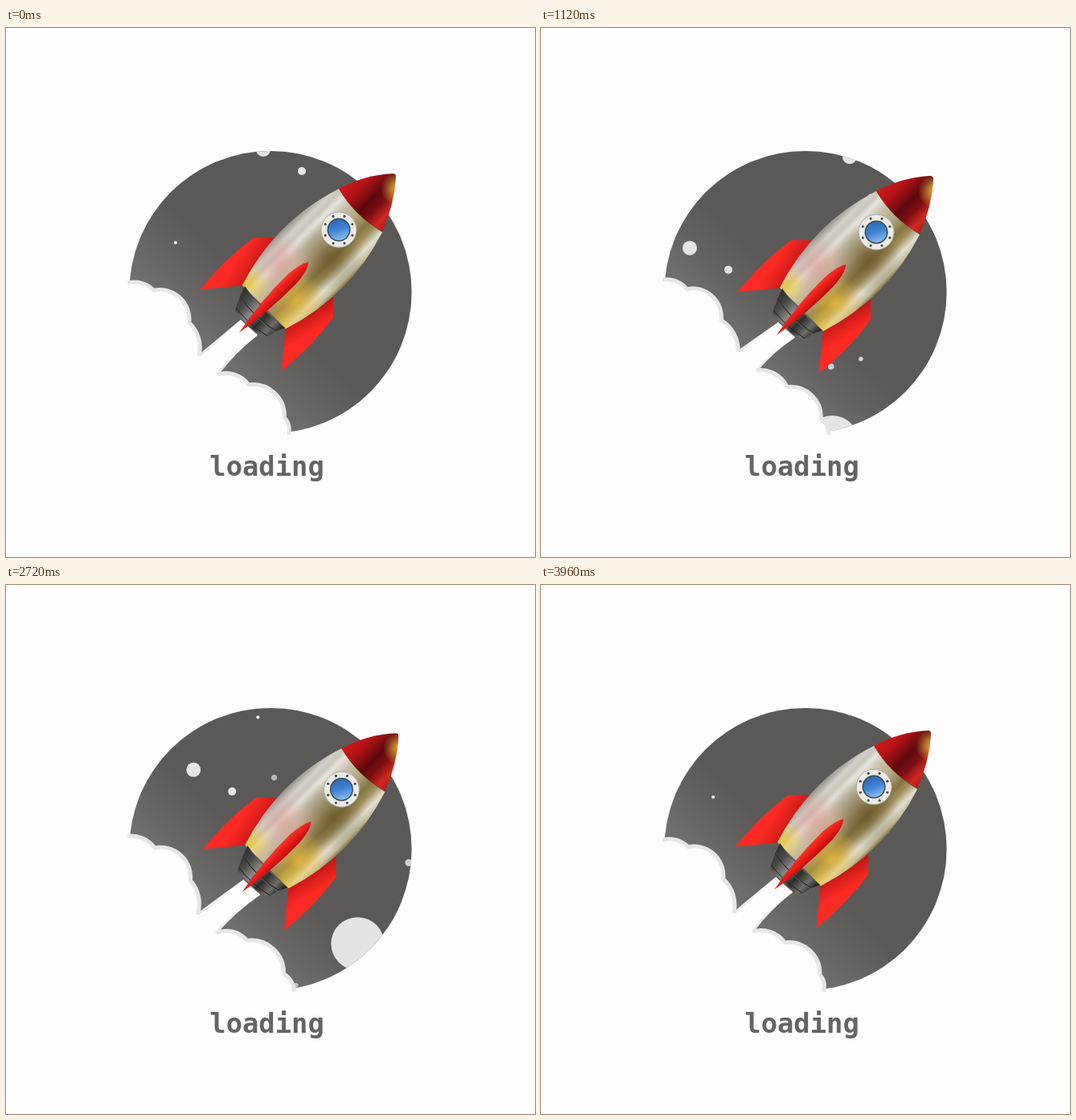
Animation, 658 px wide and 658 px high, one loop 4000 ms. Source, as an HTML page:

```html
<!DOCTYPE html>
<html lang="en">
<head>
<meta charset="utf-8">
<title>Loading</title>
<style>
  html, body { margin: 0; width: 100%; height: 100%; overflow: hidden; background: #fdfdfd; }
  svg { display: block; width: 100vw; height: 100vh; }
  text { font: bold 33.8px "DejaVu Sans Mono", monospace; fill: #656463; }
</style>
</head>
<body>
<svg viewBox="0 0 658 658">
  <defs>
    <clipPath id="disc"><circle cx="329" cy="328.5" r="175.6"/></clipPath>
    <clipPath id="hull"><path d="M414 200Q335 240 294 320L348 374Q428 333 468 254Q434 234 414 200Z"/></clipPath>
    <clipPath id="cone"><path d="M414 200Q445 183 481 181Q485 181 485 185Q483 220 468 253Q434 234 414 200Z"/></clipPath>
    <g id="grads"></g>
  </defs>

  <rect width="658" height="658" fill="#fdfdfd"/>
  <circle cx="329" cy="328.5" r="175.6" fill="url(#sky)"/>
  <g id="stars" clip-path="url(#disc)"></g>

  <path id="smoke" fill="#fdfdfd"/>
  <path id="jet" fill="none" stroke="url(#fade)" stroke-width="3"/>
  <path id="rim" fill="none" stroke="#e6e6e6" stroke-width="5" stroke-linejoin="round"/>

  <g id="rocket">
    <path fill="url(#finL)" d="M241.5 325.5Q271 288 308 261L334 261Q312 287 297 320Z"/>
    <path fill="url(#finR)" d="M342.5 426.5L348 371Q381 356 407 334L407 360Q380 397 342.5 426.5Z"/>
    <g clip-path="url(#hull)" id="skin"><rect x="280" y="190" width="200" height="200" fill="url(#metal)"/></g>
    <g clip-path="url(#cone)" id="tip"><rect x="400" y="170" width="100" height="100" fill="url(#nose)"/></g>
    <g fill="url(#steel)">
      <path d="M297 321Q318 352 347 373L336 377Q309 360 291 334Z"/>
      <path d="M291 335Q309 361 334 378L326 383Q300 368 286 347Z"/>
      <path d="M286 348Q302 369 325 383L319 384Q300 371 285 352Z"/>
    </g>
    <path fill="none" stroke="#1e1e1e" d="M291 334Q309 360 336 377M286 348Q301 368 325 383"/>
    <path fill="url(#blade)" d="M290 379Q317 339 350 307Q366 293 376 291Q376 301 361 318Q329 351 290 379Z"/>
    <g transform="translate(414 251)">
      <circle r="22" fill="#ecebe8" stroke="#a9a79f"/>
      <g id="bolts" fill="#4a4a4c"></g>
      <circle r="14.5" fill="#3a4658"/>
      <circle r="13" fill="url(#glass)"/>
    </g>
  </g>
  <text x="253.3" y="556.5">loading</text>
</svg>

<script>
const LOOP = 4000, STEP = 40, TURN = 2 * Math.PI;
const $ = id => document.getElementById(id);
const add = (parent, tag, attrs) => {
  const el = document.createElementNS("http://www.w3.org/2000/svg", tag);
  for (const k in attrs) el.setAttribute(k, attrs[k]);
  parent.appendChild(el);
  return el;
};

// stops are written as "colour position%" pairs
function gradient(id, x1, y1, x2, y2, stops) {
  const grad = add($("grads"), "linearGradient", { id, x1, y1, x2, y2, gradientUnits: "userSpaceOnUse" });
  for (const stop of stops.split(", ")) {
    const [color, offset] = stop.split(" ");
    add(grad, "stop", { "stop-color": color, offset });
  }
}
gradient("sky", 320, 340, 236, 424, "#5b5957 0%, #787674 100%");
gradient("fade", 256, 416, 288, 386, "#e6e6e6 0%, #fdfdfd 100%");
gradient("metal", 297.5, 297.5, 370.5, 370.5,
  "#96938a 0%, #d2d0c8 10%, #c9c6bc 17%, #e6e4dc 23%, #cac3b0 33%, #b8a985 50%, #85763f 67%, #9f8f5c 76%, #e2dfd2 87%, #c4bd9e 95%, #85764a 100%");
gradient("nose", 414, 200, 468, 254, "#d41a1a 0%, #b01214 24%, #5c0a10 50%, #7c0e12 66%, #d02820 85%, #b41a18 100%");
gradient("steel", 288, 328, 338, 378, "#2a2a2a 0%, #4b4b4a 25%, #8a8a88 45%, #2c2c2b 65%, #6d6d6a 85%, #262626 100%");
gradient("finL", 292, 282, 320, 300, "#fc2a24 0%, #b81414 100%");
gradient("finR", 386, 376, 372, 352, "#fc2a24 0%, #b81414 100%");
gradient("blade", 329, 328, 341, 340, "#f8342c 0%, #ea1c18 45%, #a80e10 100%");
gradient("glass", -4, -13, 4, 13, "#2f66b4 0%, #4285d2 50%, #8cc0f2 100%");

// soft colour spots on the hull and nose
function glow(parent, cx, cy, r, color, alpha) {
  const id = `spot${cx}-${cy}`;
  const grad = add($("grads"), "radialGradient", { id });
  add(grad, "stop", { "stop-color": color, "stop-opacity": alpha });
  add(grad, "stop", { offset: 1, "stop-color": color, "stop-opacity": 0 });
  add(parent, "circle", { cx, cy, r, fill: `url(#${id})` });
}
glow($("skin"), 402, 284, 44, "#57451c", .55);
glow($("skin"), 342, 294, 38, "#dc9c94", .7);
glow($("skin"), 362, 340, 36, "#eebc3a", .8);
glow($("skin"), 302, 318, 26, "#e8c840", .9);
glow($("skin"), 345, 372, 26, "#ecc43c", .8);
glow($("tip"), 488, 200, 22, "#f6cc3c", .95);

for (let i = 0; i < 8; i++) {
  const a = (i + .5) * TURN / 8;
  add($("bolts"), "circle", { cx: 18.2 * Math.cos(a), cy: 18.2 * Math.sin(a), r: 1.6 });
}

// a star passes (x, y) at time `at`, drifting vx, vy px per ms
const stars = [];
function star(x, y, r, at, [vx, vy], { period = LOOP, fill = "#e5e4e3", opacity = 1 } = {}) {
  stars.push({ x, y, at, vx, vy, period, el: add($("stars"), "circle", { r, fill, opacity }) });
}

const far = [-.1205, .1095], mid = [-.148, .14], near = [-.188, .172];
star(490, 398, 33, 440, near, { period: 2000 });
star(320, 151, 9, 0, far, { period: 2000 });
star(368, 178, 5, 0, far, { period: 2000 });
star(307, 233, 9, 1640, mid);
star(334, 284, 5, 1640, mid);

// quick specks that cross the disc, all gone at the seam of the loop
let seed = 7;
const random = () => (seed = seed * 16807 % 2147483647) / 2147483647;
const SPECKS = 18;
for (let i = 0; i < SPECKS; i++) {
  const side = (random() - .5) * 240;
  const at = 600 + 2700 * (i + random()) / SPECKS;
  star(329 + side, 328 + side, 1.6 + 3.2 * random(), at, [-.213, .23], { opacity: .6 + .4 * random() });
}

// one slow spark that carries over the seam
const spark = add($("stars"), "circle", { r: 2, fill: "#fff" });

const place = (el, x, y) => { el.setAttribute("cx", x); el.setAttribute("cy", y); };

// arcs through the cusps; bulge is radius over chord
function bumps(p, bulge) {
  let d = `A`;
  d = "";
  for (let i = 1; i < p.length; i++) {
    const [x, y] = p[i], r = bulge[i - 1] * Math.hypot(x - p[i - 1][0], y - p[i - 1][1]);
    d += `A${r} ${r} 0 0 1 ${x} ${y}`;
  }
  return d;
}

function draw(t) {
  for (const s of stars) {
    const dt = t % s.period - s.at;
    place(s.el, s.x + s.vx * dt, s.y + s.vy * dt);
  }
  const drift = .08 * (t < LOOP / 2 ? t : t - LOOP);
  place(spark, 211 - drift, 267 + drift);

  const shift = 4 * Math.sin(Math.PI * t / LOOP);
  $("rocket").setAttribute("transform", `translate(${shift} ${shift * .95})`);

  // the smoke puffs three times per loop while its ends sway once
  const puff = Math.cos(TURN * (3 * t / LOOP - 1 / 3));
  const sway = Math.sin(TURN * t / LOOP - .3);
  const swell = Math.cos(TURN * t / LOOP);
  const inset = ([x, y]) => [x - 1.7, y + 1.7];
  const left = [
    [153, 312 + 3.5 * swell],
    [188 + 5 * puff, 326 + 3 * puff],
    [233 + 7 * puff, 367.5 + 5.5 * puff],
    [243 + 4 * sway, 405 - 4 * sway]
  ].map(inset);
  const right = [
    [266 + 4 * sway, 428 - 4 * sway],
    [299 - 9 * puff, 439 - 6 * puff],
    [346 - 4 * puff, 481 - 3.5 * puff],
    [358 - 5 * swell, 504]
  ].map(inset);

  const bankL = bumps(left, [1, .62, 1]), bankR = bumps(right, [.85, .65, 1]);
  const ax = 293 + shift, ay = 364 + shift, bx = 312 + shift, by = 381 + shift;
  const [lx, ly] = left[3], [rx, ry] = right[0];
  const sideR = `Q${(rx + bx) / 2 - 4} ${(ry + by) / 2 - 3} ${rx} ${ry}`;
  $("smoke").setAttribute("d",
    `M${left[0]}${bankL}L${ax} ${ay}L${bx} ${by}${sideR}${bankR}L350 520L140 520L140 ${left[0][1]}Z`);
  $("rim").setAttribute("d", `M${left[0]}${bankL}M${right[0]}${bankR}`);
  $("jet").setAttribute("d", `M${lx} ${ly}L${ax} ${ay}M${bx} ${by}${sideR}`);
}

const start = performance.now();
function tick() {
  const t = (performance.now() - start) % LOOP;
  draw(Math.floor(t / STEP) * STEP);
  requestAnimationFrame(tick);
}
tick();
</script>
</body>
</html>
```
